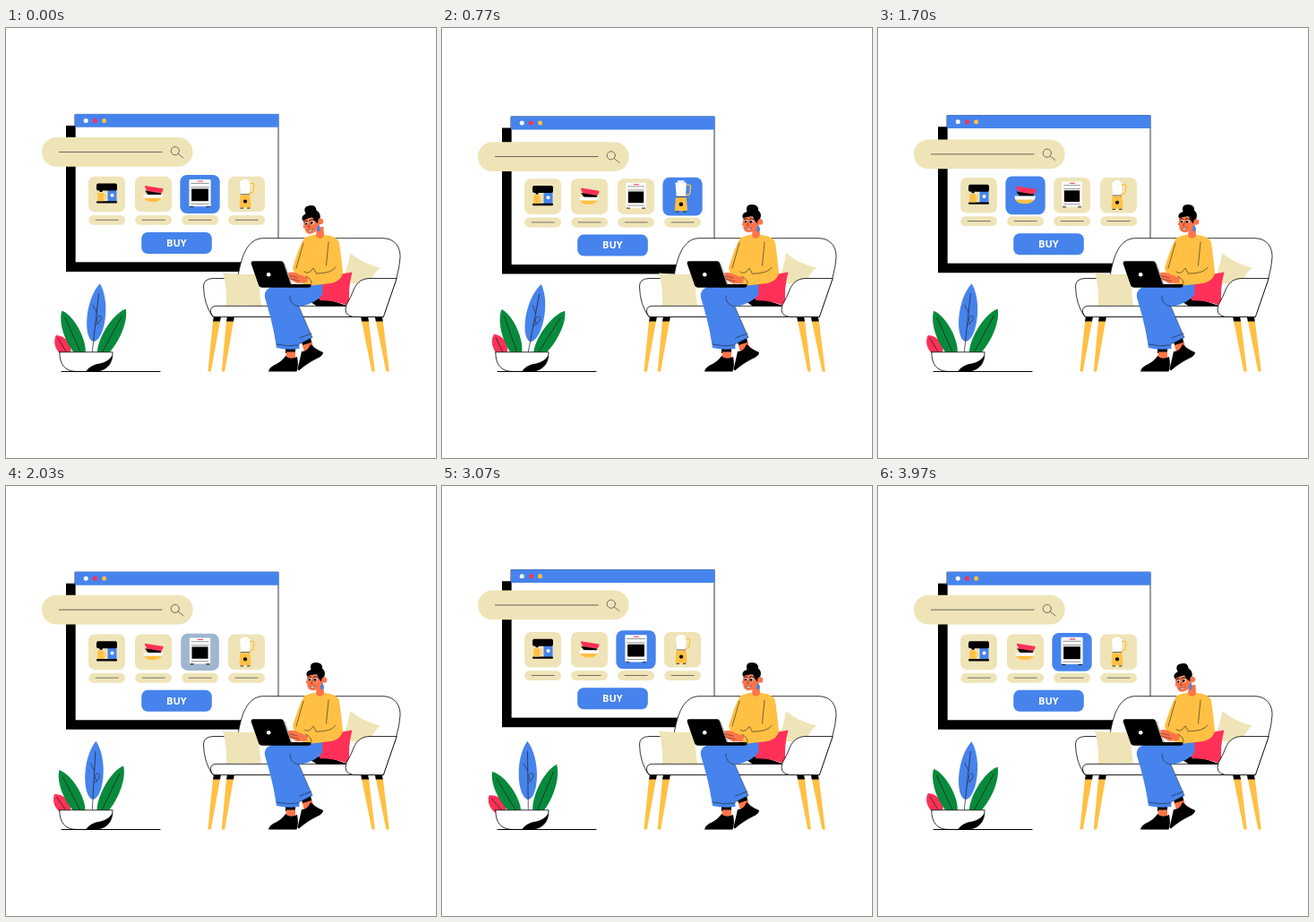
Animation of 480x480 px, one loop 4 s. Source, as an HTML page with a canvas:

```html
<!DOCTYPE html>
<html lang="en">
<head>
<meta charset="utf-8">
<title>Online shopping</title>
<style>
html, body { margin: 0; width: 100%; height: 100%; overflow: hidden; background: #fff; }
canvas { display: block; width: 480px; height: 480px; }
</style>
</head>
<body>
<canvas id="stage"></canvas>
<script>
const LOOP = 4000;
const BLUE = '#4683ec', SAND = '#efe4b7', YELLOW = '#ffc044', RED = '#ff3158',
      GREEN = '#078a3c', SKIN = '#ff7448', BLACK = '#000', WHITE = '#fff',
      INK = '#222', GREY = '#555';
const canvas = document.getElementById('stage');
const ctx = canvas.getContext('2d');
const ratio = window.devicePixelRatio || 1;
canvas.width = canvas.height = 480 * ratio;

const clamp = v => Math.max(0, Math.min(1, v));
const smooth = v => { v = clamp(v); return v * v * (3 - 2 * v); };
const wave = (t, shift = 0, cycles = 1) => Math.sin((t + shift) / LOOP * 2 * Math.PI * cycles);

function paint(path, fill, line, width = 0.8) {
  if (fill) { ctx.fillStyle = fill; ctx.fill(path); }
  if (line) { ctx.strokeStyle = line; ctx.lineWidth = width; ctx.stroke(path); }
}
const shape = (d, fill, line, width) => paint(new Path2D(d), fill, line, width);
const stroke = (d, width, color = INK) => shape(d, null, color, width);

function box(x, y, w, h, r, fill, line) {
  const p = new Path2D();
  p.roundRect(x, y, w, h, r);
  paint(p, fill, line);
}
function dot(x, y, r, fill, line) {
  const p = new Path2D();
  p.arc(x, y, r, 0, 7);
  paint(p, fill, line);
}
function group(draw, x = 0, y = 0, turn = 0, scale = 1) {
  ctx.save();
  ctx.translate(x, y);
  ctx.rotate(turn);
  ctx.scale(scale, scale);
  draw();
  ctx.restore();
}

// Product pictures, drawn around the centre of their card.
const products = [
  function coffeeMaker() {
    box(1, -6, 10, 15, 1, BLUE);
    box(-11.5, -12, 23, 8, 2, BLACK);
    box(-11.5, 7.7, 23, 2.4, 1, BLACK);
    box(-10.3, -1.5, 7, 9.2, 1, YELLOW);
    stroke('M-3.5 1 h2 v4 h-2', 0.8, YELLOW);
    box(-8, -4.5, 3, 2, 0, BLACK);
    dot(6, 1.2, 2, WHITE);
  },
  function bowls() {
    shape('M-9.5 -9.5 L11 -6.3 Q11 -2.5 8 -1 L-6 -3 Q-9 -5 -9.5 -9.5Z', RED);
    shape('M-9.5 -4 L9 -1 L8 1.2 L-6 .6Z', BLACK);
    shape('M-11.3 .6 H10.5 Q10 4 9 5 H-10 Q-11 3 -11.3 .6Z', WHITE);
    shape('M-10.5 4.3 H9.5 Q6 8.8 -.5 8.8 Q-8 8.8 -10.5 4.3Z', YELLOW);
  },
  function oven() {
    box(-11.2, -15.3, 22.4, 28, 1, WHITE);
    stroke('M-9 -11.2 H9 M-9 -7.2 H9 M-9 10 H9', 0.6, GREY);
    stroke('M-2 -13.4 H3', 1, RED);
    box(-8.7, -5.6, 17.4, 12.8, 0.6, BLACK);
    stroke('M-10 13 h3 M7 13 h3', 1);
  },
  function blender() {
    shape('M-7.5 -14.5 H4 L3.3 0 H-6.3Z', WHITE);
    box(-5.2, -16.5, 7, 2.3, 0.8, WHITE);
    stroke('M4 -12 h2.5 q2 0 1.8 2 l-.8 6.5 q-.4 2 -2.5 2 h-1.5', 1.3, YELLOW);
    stroke('M-6.3 .2 H3.3', 0.7);
    shape('M-7 1 H4 L5 13 Q5 15 3.5 15 H-6.5 Q-8 15 -8 13Z', YELLOW);
    dot(-1.5, 8, 2.1, BLACK);
    stroke('M-6.5 15.6 h2.5 M1 15.6 h2.5', 1);
  }
];

// Selected card, with start and end of the selection.
const picks = [
  [2, -1210, 280], [3, 400, 1200], [1, 1313, 1860],
  [2, 1973, 2260], [3, 2340, 2730], [2, 2850, 4280]
];
const FADE = 120;
function glow(card, t) {
  let g = 0;
  for (const [c, from, to] of picks) {
    if (c === card) g = Math.max(g, Math.min(smooth((t - from) / FADE), smooth((to + FADE - t) / FADE)));
  }
  return g;
}
function blend(g) {
  const a = [239, 228, 183], b = [70, 131, 236];
  return `rgb(${a.map((v, i) => Math.round(v + (b[i] - v) * g)).join()})`;
}

function browser(t) {
  group(() => {
    box(67, 109, 226, 163, 0, BLACK);
    box(77.4, 96.4, 226.6, 165.4, 0, WHITE, BLACK);
    box(77, 96, 227.4, 14.8, 0, BLUE);
    [WHITE, RED, YELLOW].forEach((c, i) => dot(89.2 + i * 10.2, 103.5, 2.5, c));
    products.forEach((draw, i) => {
      const x = 92.2 + i * 52, g = glow(i, t);
      group(() => {
        box(-20.5, -19.8, 41, 39.6, 7, blend(g));
        draw();
      }, x + 20.3, 185.5, 0, 1 + 0.08 * g);
      box(x, 209, 40.8, 10.8, 5.4, SAND);
      stroke(`M${x + 8} 214.3 h25`, 0.8, GREY);
    });
    box(151.2, 228, 78.6, 24, 7, BLUE);
    ctx.fillStyle = WHITE;
    ctx.font = '600 11px "Noto Sans", sans-serif';
    ctx.textAlign = 'center';
    ctx.fillText('BUY', 190.3, 243.8);
  }, 0, 2.8 * wave(t));
  group(() => {
    box(40, 122, 168.6, 32.8, 16.4, SAND);
    stroke('M59.5 138.4 H174', 0.9, GREY);
    dot(188.8, 137.2, 4.6, null, GREY);
    stroke('M192.2 140.6 L198 145', 0.8, GREY);
  }, 0, 5.5 * wave(t));
}

function leaf(x, y, deg, len, half, color, stem = 0) {
  group(() => {
    const low = -stem - 2, high = -len * 0.74;
    shape(`M0 ${-stem} C${-half * 1.2} ${low} ${-half * 1.5} ${high} 0 ${-len}
      C${half * 1.5} ${high} ${half * 1.2} ${low} 0 ${-stem}Z`, color);
    stroke(`M0 0 V${-len * 0.85}`, 0.7);
    if (stem) stroke('M0 -30 Q6 -34 6 -39 Q4 -43 1.5 -39 Q0 -35 3 -32 M0 -44 L-5 -52', 0.6);
  }, x, y, deg * Math.PI / 180);
}

function plant(t) {
  const s = wave(t, 160);
  leaf(70, 366, -33.5 + 7.5 * s, 27, 7.5, RED);
  leaf(86, 368, -25.7 + 6 * s, 57.5, 9, GREEN);
  leaf(104, 368, 27.4 + 5 * s, 62, 9, GREEN);
  leaf(96.3, 361.5, 4.9 + 6 * s, 76.8, 10, BLUE, 11.5);
  const bowl = 'M59.8 361.8 H119 Q119 383.4 97 383.4 H78 Q59.8 383 59.8 361.8Z';
  shape(bowl, WHITE);
  shape('M119 365 Q117 383.4 97 383.4 H89 Q94 376 105 374.5 Q114 373 119 365Z', BLACK);
  stroke(bowl, 0.8, BLACK);
  stroke('M62 383.5 H172', 1, BLACK);
}

function sofa() {
  for (const [top, foot] of [[232, 225], [247, 240.3], [396, 408], [411.8, 424]]) {
    const dir = foot > top ? 1 : -1;
    shape(`M${top + dir} 327 h8 L${foot + 3.8} 383.5 h-3.4Z`, YELLOW);
    shape(`M${top} 322 h8 l${dir} 5.5 h-8Z`, BLACK);
  }
  shape('M258.5 280 C262 258 268 235 287 234.7 H421 C435 235 440.5 246 440 256 Q439.5 266 435.8 279.5 L421 322.5 H250Z', WHITE, BLACK);
  shape('M384 251 Q398 263 418 267.5 Q409 274 406 287 L374 284 Q382 268 384 251Z', SAND);
  shape('M260 279.5 H231 Q220 280 220.5 289 Q221 309 231 322.5 H390 V310 H260Z', WHITE);
  stroke('M260 279.5 H231 Q220 280 220.5 289 Q221 309 231 322.5 H421', 0.8, BLACK);
  shape('M242 273.5 Q262 276 283 274 Q282 292 285 310.3 Q265 308.5 246 310.3 Q247 290 242 273.5Z', SAND);
  stroke('M384 310.3 H234 Q228.5 311 228.3 316 Q228.5 321 232 322.5', 0.8, BLACK);
  shape('M337 304 L354 301 L382 310.6 H347Z', BLACK);
  shape('M350 276 Q370 276 386.5 272.5 Q381 292 384 311 Q369 304 350 304Z', RED);
  shape('M435.8 279.5 H405 Q394 280 389 290 Q385 301 380 309 Q376 321 388 322.5 H421Z', WHITE, BLACK);
}

function legs() {
  shape('M329 348 L340 346 L342 354 L333 359Z', BLACK);
  shape('M331 354 L341 351 L344 357 L333 362Z', SKIN);
  shape('M330 361 Q336 362 340 353 Q346 359 354 362 Q354 366 347 369 Q335 375 327 382.5 L325.5 381Z', BLACK);
  shape('M312 357 H323 V363 H312Z', BLACK);
  shape('M313 361.5 H323 V370 H312Z', SKIN);
  shape('M312 366 Q317 371 325 367 Q327 376 324.5 383.5 H293 Q294 378 302 375 Q309 371 312 366Z', BLACK);
  shape('M316 300 L344 303 Q336 309 327 311 L342 345.5 L327 353Z', BLUE, INK, 0.5);
  shape('M353 284 L304 288 Q287 289 289 301 C295 321 299 336 302 357 Q314 360 327.5 358 Q325 330 327 311 Q346 308 353.5 297Z', BLUE);
  stroke('M302 353 Q314 356 327 354 M327 311 Q316 309 317 299', 0.6);
  stroke('M327.5 346 L341 341', 0.6);
}

function head(t) {
  // Looks down at the screen around the start of the loop.
  const u = t > LOOP / 2 ? t - LOOP : t;
  const nod = u < 0 ? smooth((u + 480) / 300) : 1 - smooth((u - 160) / 300);
  shape('M347 222 H354.5 L355 232 Q350 238 346 232Z', SKIN);
  group(() => {
    shape('M-13.5 -21 L-14 -14.5 L-15.5 -11.5 L-13.8 -10.5 Q-14 -3.2 -8 -2.8 Q-1 -3 3 -9 L4.5 -19Z', SKIN);
    dot(5, -14.5, 3.3, SKIN);
    shape('M-14 -18.5 Q-16.5 -24 -9.5 -26 Q-12 -34 -4 -34 Q3.5 -34 3 -27.5 Q7.5 -23.5 5.2 -18 Q2 -17.5 2 -12.5 Q-1 -15 -3 -20.5 Q-9 -21 -14 -18.5Z', BLACK);
    dot(-10.5, -15, 1.7, WHITE);
    dot(-4.3, -15, 2.1, WHITE);
    dot(-10.9, -14.8, 1.2, BLACK);
    dot(-4.9, -14.8, 1.5, BLACK);
    stroke('M-6.8 -17.6 Q-4.3 -19 -2 -17.2 M-12.8 -17.6 Q-11 -18.8 -9.3 -17.6', 0.8, BLACK);
    stroke('M-8 -14 L-9.4 -10.5 L-7.8 -10.2', 0.5);
    shape('M-10.5 -7.4 Q-7.5 -6.4 -4.8 -8.2 Q-6 -5 -8.6 -5.2Z', WHITE, INK, 0.4);
  }, 350 - 1.2 * nod, 231, -0.19 * nod);
  const ex = 353 - 4 * nod;
  shape(`M${ex} 219 l2 6 q-1 3 -3.6 2 l-.4 -3Z`, BLUE);
}

function woman(t) {
  legs();
  const tap = wave(t, 0, 12);
  shape('M333.5 234 Q339 231.5 345 230.5 Q349 235 355 231 Q368 232 371.5 238 Q373 244 376 273 Q374 284 359 285.5 L336 288 L324 281 L320 268 Q328 241 333.5 234Z', YELLOW);
  stroke('M332 240 L324 268 M360 239 L357.5 265', 0.6);
  group(() => {
    shape('M315 273 Q321 271 328 275.5 L337 278.5 L336 284 L325 285 L316 280Z', SKIN);
    stroke('M317 276.5 L325 278.5 M318 280 L327 282', 0.5);
  }, 0, tap * 0.6);
  shape('M333 272 Q338 275 343 268 Q356 265 369 267 L375 275 Q372 284 360 283 L341 286 Q341 279 335 277Z', YELLOW);
  group(() => stroke('M333 272 Q338 276 343 268 L346 273 M335 277 Q342 281 341 286 M368 267 Q364 274 346 274', 0.6), 0, tap * 0.3);
  head(t);
}

function laptop() {
  shape('M276 260.3 H307 Q309.3 260.3 310 262.5 L318 286 H340 Q342 289.8 337 289.8 H286 Q283 289.8 282 287 L273.8 263.5 Q273 260.3 276 260.3Z', BLACK);
  stroke('M311 263 L319 286', 0.5, GREY);
  dot(293.2, 275.3, 2.3, WHITE);
}

function frame(now) {
  const t = now % LOOP;
  ctx.setTransform(ratio, 0, 0, ratio, 0, 0);
  ctx.lineCap = ctx.lineJoin = 'round';
  ctx.fillStyle = WHITE;
  ctx.fillRect(0, 0, 480, 480);
  browser(t);
  plant(t);
  sofa();
  woman(t);
  laptop();
}

const start = performance.now();
function tick() {
  frame(performance.now() - start);
  requestAnimationFrame(tick);
}
tick();
</script>
</body>
</html>
```
